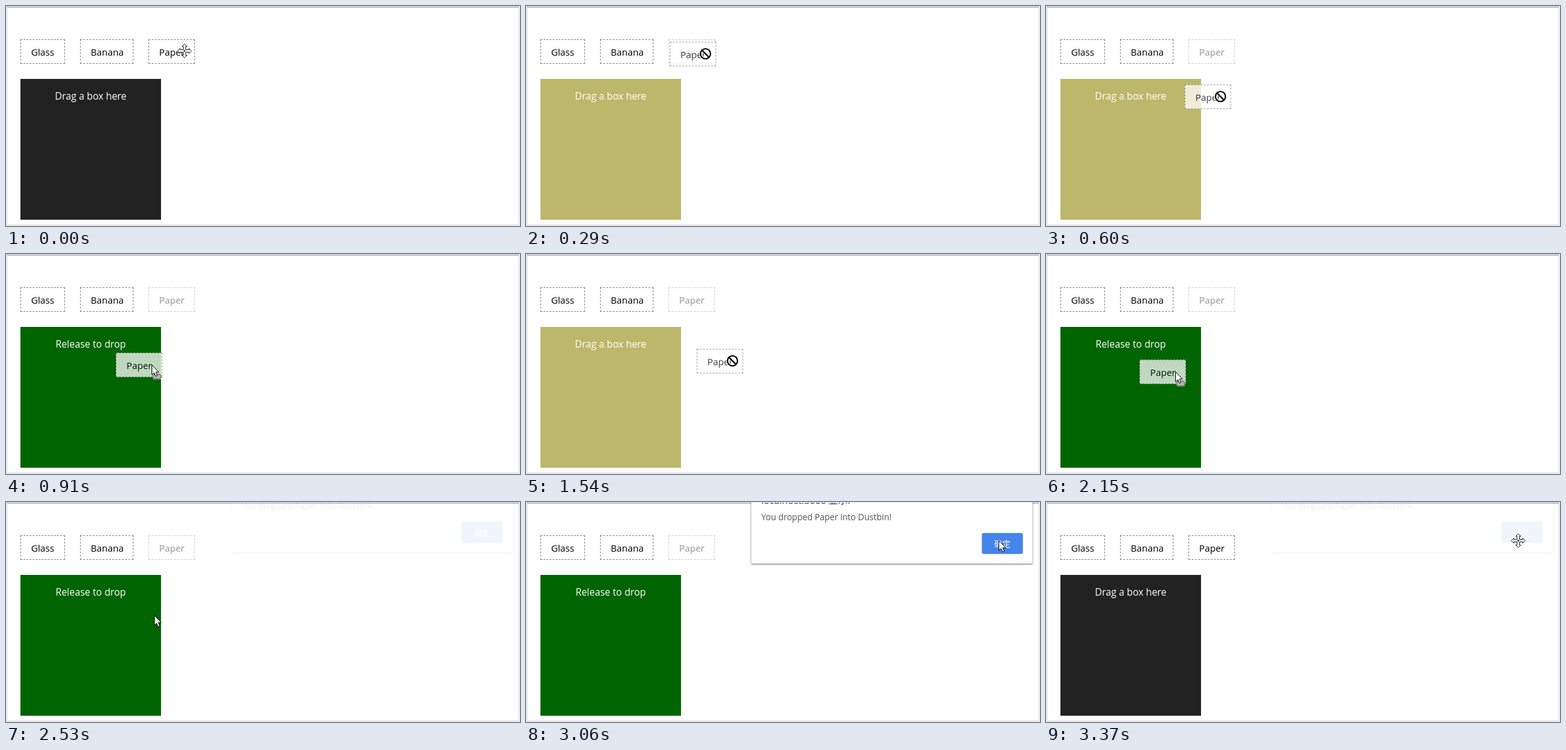
An HTML page for the animation above (3.45 s loop, 819x350 px).

```html
<!DOCTYPE html>
<html lang="zh-CN">
<head>
<meta charset="utf-8">
<title>Drag and drop</title>
<style>
html, body { margin: 0; width: 100%; height: 100%; overflow: hidden; background: #fff; }
#stage {
  position: absolute; left: 0; top: 0; width: 819px; height: 350px; overflow: hidden;
  background: #fff; font: 14.8px "Open Sans", "Noto Sans", sans-serif; color: #000;
}
#stage * { position: absolute; box-sizing: border-box; white-space: nowrap; }
#frame {
  left: 1px; top: 1px; width: 817px; height: 348px;
  border: 1px solid #d0d0d4; border-top-color: #a9a9ad;
  box-shadow: inset 0 1px #d6d6d9, 0 -1px #efeff1;
}
.box {
  top: 53px; height: 39px; padding-left: 16px; line-height: 39px;
  border: 1px dashed gray; background: #fff;
}
#bin {
  left: 23px; top: 116px; width: 224px; height: 224px; padding-top: 8px;
  font-size: 15.4px; line-height: 39px; text-align: center; color: #fff;
}
#ghost { left: 0; top: 0; width: 74px; opacity: .75; }
#clip { left: 0; top: 1px; width: 819px; height: 349px; overflow: hidden; }
#dialog {
  left: 359px; top: -61px; width: 448px; height: 158px; background: #fff;
  border-radius: 2px; box-shadow: 0 1px 3px rgba(0, 0, 0, .6);
}
#dialog div { left: 16px; line-height: 20px; }
#dialog .title { top: 47px; font-size: 15.3px; color: #333; }
#dialog .msg { top: 74px; font-size: 13.6px; color: #555; }
#dialog .ok {
  left: 368px; top: 110px; width: 64px; height: 32px; line-height: 32px;
  border-radius: 2px; text-align: center; color: #fff; background: #4683ea;
  font-size: 13px; font-family: "Noto Sans CJK SC", "Noto Sans CJK", sans-serif;
  box-shadow: 0 0 0 1px #7fabf2;
}
#cursors { left: 0; top: 0; }
</style>
</head>
<body>
<div id="stage">
  <div id="frame"></div>
  <div class="box" style="left:23px;width:71px">Glass</div>
  <div class="box" style="left:118px;width:85px">Banana</div>
  <div class="box" id="paper" style="left:227px;width:74px">Paper</div>
  <div id="bin"></div>
  <div class="box" id="ghost">Paper</div>

  <div id="clip">
    <div id="dialog">
      <div class="title">localhost:3000 显示:</div>
      <div class="msg">You dropped Paper into Dustbin!</div>
      <div class="ok">确定</div>
    </div>
  </div>

  <svg id="cursors" width="819" height="350">
    <g id="move" fill="#fff" stroke="#1c1c2c">
      <path d="M-2-2V-7H-4L0-11L4-7H2V-2H7V-4L11 0L7 4V2H2V7H4L0 11L-4 7H-2V2H-7V4L-11 0L-7-4V-2Z"/>
      <path d="M-2 0H2M0-2V2"/>
    </g>
    <g id="deny" fill="none">
      <g stroke="#fff" stroke-width="4"><circle r="8"/><path d="M-5.6-5.6L5.6 5.6"/></g>
      <g stroke="#000" stroke-width="2.2"><circle r="8"/><path d="M-5.6-5.6L5.6 5.6"/></g>
    </g>
    <g id="arrow">
      <g id="badge" stroke-width="2">
        <rect x="2.5" y="15.5" width="12" height="7" rx="2" fill="#bbb" stroke="#fff"/>
        <rect x="2.5" y="15.5" width="12" height="7" rx="2" fill="none" stroke="#000" stroke-dasharray="1 1"/>
      </g>
      <path fill="#fff" stroke="#000" d="M.5.5V16.2L4 12.9L6.6 18.6L9.1 17.5L6.6 11.9H11.4Z"/>
    </g>
  </svg>
</div>
<script>
const LOOP = 3450, STEPS = 45, LEAD = 14;
const GRAB_AT = 3, DROP_AT = 32, CLOSE_AT = 43;
const GRAB_X = 57, GRAB_Y = 19;

// Turning points of the dragged box: step, left, top
const dragPath = [
  [3, 229, 57], [5, 239, 78], [8, 221, 125], [9, 190, 145], [12, 175, 157],
  [15, 175, 157], [18, 265, 152], [21, 274, 151], [26, 154, 168], [28, 149, 168]
];
// The pointer's way to the button
const clickPath = [[32, 206, 187], [39, 751, 61], [40, 753, 61]];

const $ = id => document.getElementById(id);
const clamp = v => Math.min(1, Math.max(0, v));
const ramp = (a, b, v) => clamp((v - a) / (b - a));
const smooth = u => u * u * (3 - 2 * u);

function along(path, k) {
  let [, x, y] = path[0];
  for (let i = 1; i < path.length; i++) {
    const [end, nx, ny] = path[i];
    const u = smooth(ramp(path[i - 1][0], end, k));
    x += (nx - path[i - 1][1]) * u;
    y += (ny - path[i - 1][2]) * u;
  }
  return [Math.round(x), Math.round(y)];
}

const place = (el, x, y) => el.style.transform = `translate(${x}px,${y}px)`;
const toggle = (id, on) => $(id).style.display = on ? "" : "none";

function point(name, x, y) {
  for (const id of ["move", "deny", "arrow"]) toggle(id, id === name);
  $(name).setAttribute("transform", `translate(${x} ${y})`);
}

function setBin(color, label) {
  $("bin").style.background = color;
  $("bin").textContent = label;
}

function draw(k) {
  const dragging = k >= GRAB_AT && k < DROP_AT;
  const held = k >= GRAB_AT && k < CLOSE_AT;
  const [x, y] = along(dragPath, k);
  const tip = dragging ? [x + GRAB_X, y + GRAB_Y] : along(clickPath, k);
  const over = held && (!dragging || tip[0] <= 247 && tip[1] >= 116);

  $("paper").style.opacity = held ? .4 : 1;
  toggle("ghost", dragging);
  toggle("badge", dragging);
  place($("ghost"), x, y);

  if (over) setBin("#006400", "Release to drop");
  else setBin(held ? "#bdb76b" : "#222", "Drag a box here");

  if (k < GRAB_AT) point("move", 284.5, 71.5);
  else if (k > CLOSE_AT) point("move", 752.5, 61.5);
  else point(dragging && !over ? "deny" : "arrow", ...tip);

  const open = Math.min(ramp(DROP_AT, DROP_AT + 3, k), ramp(STEPS, CLOSE_AT - 1, k));
  $("dialog").style.opacity = open ** 2.3;
  place($("dialog"), 0, -27 * (1 - open));
}

const start = performance.now();
function tick() {
  const t = (performance.now() - start) % LOOP;
  draw(Math.min(STEPS - 1, Math.floor((t + LEAD) * STEPS / LOOP)));
  requestAnimationFrame(tick);
}
tick();
</script>
</body>
</html>
```
